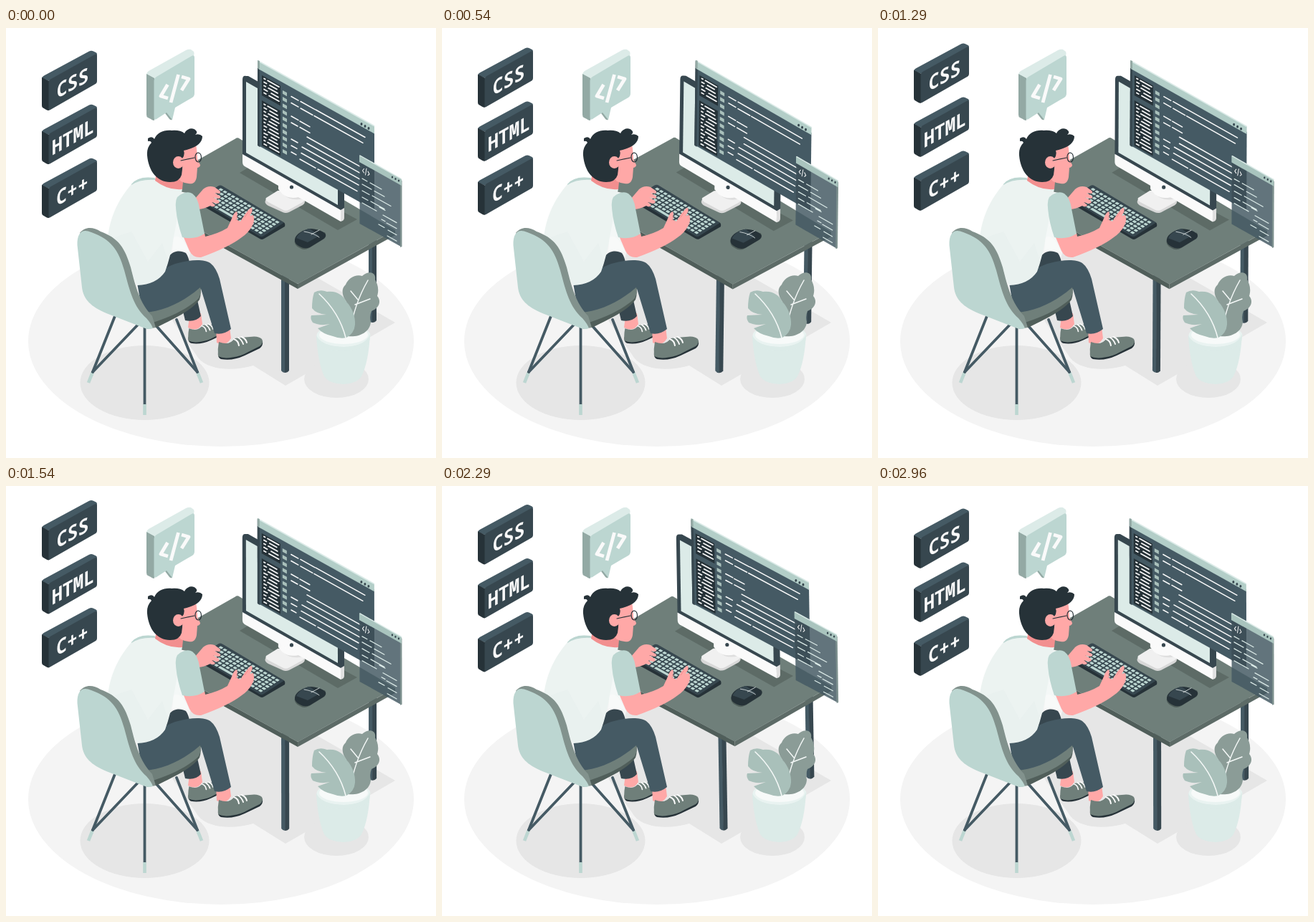
Animation of 600 by 600 pixels, one loop 3000 ms. Source, as an HTML page:

```html
<!DOCTYPE html>
<html lang="en">
<head>
<meta charset="utf-8">
<title>Programmer at a desk</title>
<style>
html, body { margin: 0; width: 100%; height: 100%; overflow: hidden; background: #fff; }
svg { display: block; width: 100vw; height: 100vh; }
.tag { font: 800 28.5px "Noto Sans Mono", "DejaVu Sans Mono", monospace; fill: #fafafa; text-anchor: middle; }
.ink { fill: none; stroke-linecap: round; stroke-linejoin: round; }
</style>
</head>
<body>
<svg id="stage" viewBox="0 0 600 600"></svg>
<script>
const C = {
  ink: '#263238', dark: '#37474f', slate: '#455a64', moss: '#6f7f7a', mossDark: '#505e5a',
  mint: '#bcd6d1', pale: '#dcebe8', skin: '#ffa8a7', blush: '#f28f8f', white: '#fafafa'
};
const SLOPE = 0.558;
const fill = (d, color, extra = '') => `<path d="${d}" fill="${color}" ${extra}/>`;
const ink = (d, color, width = 1.6, extra = '') =>
  `<path class="ink" d="${d}" stroke="${color}" stroke-width="${width}" ${extra}/>`;
const oval = (x, y, rx, ry, color) => `<ellipse cx="${x}" cy="${y}" rx="${rx}" ry="${ry}" fill="${color}"/>`;
const row = (x, y, len) => `M${x} ${y}l${len} ${(len * SLOPE).toFixed(2)}`;
const rows = list => list.map(r => row(...r)).join('');
// Upright panel receding to the right.
const panel = (x, y, w, h, color, extra) =>
  fill(`M${x} ${y}l${w} ${w * SLOPE}v${h}l${-w} ${-w * SLOPE}z`, color, extra);

function floor() {
  return oval(300, 437, 269, 147, '#f4f4f4') +
    fill('M390 499L543 411L385 320L262 296L232 408L268 460C282 478 318 479 345 471Z', '#e6e6e6') +
    oval(193.5, 495, 90, 52, '#e6e6e6') + oval(461, 490, 45, 26, '#e6e6e6');
}

function leg(x, y, bottom) {
  return fill(`M${x} ${y}V${bottom - 3}Q${x + 2} ${bottom} ${x + 5.5} ${bottom}V${y}Z`, C.slate) +
    fill(`M${x + 5} ${y}V${bottom}Q${x + 9} ${bottom} ${x + 11} ${bottom - 3}V${y}Z`, C.dark);
}

function desk() {
  return leg(384, 345, 481) + leg(506, 285, 411) +
    fill('M182 233L407 357V364L182 240Z', C.mossDark) +
    fill('M407 357L543 282V289L407 364Z', '#5d6b67') +
    fill('M320 154.5Q323 152 326 154.5L543 282L410 355.5Q407 358 404 355.5L182 233Z', C.moss) +
    fill('M326 202L346 190L490 267L463 282Z', '#5d6b66');
}

function keyboard() {
  let keys = '';
  for (let r = 0; r < 6; r++)
    for (let c = 0; c < 15; c++) {
      const space = r === 5 && c === 4;
      if (r === 5 && c > 4 && c < 9) continue;
      keys += `<rect x="${3 + c * 5.6}" y="${2.5 + r * 4.6}" width="${space ? 26 : 4}" height="3.1" rx=".6"/>`;
    }
  return fill('M299 220L388 271.5Q390 273 389 277L360 294Q357 296 354 294L267 244V239Z', C.ink) +
    fill('M296 220.5Q299 218.5 302 220.5L388 271.5L359 290.5Q356 292 353 290L267 239Z', C.dark) +
    `<g fill="${C.mint}" transform="matrix(1 .577 -1 .645 299 220)">${keys}</g>`;
}

function mouse() {
  return fill('M403 295Q401 303 410 307Q416 311 423 307L444 294Q448 290 445 285Z', C.mossDark) +
    fill('M403 295C404 287 416 281 424 280C434 280 444 284 446 288Q447 292 442 295L424 306Q417 309 410 305Q402 301 403 295Z', C.ink) +
    fill('M405 293C408 286 417 281 424 280L437 290L421 299Z', C.dark) +
    ink('M416 284Q429 286 437 292M426 288L437 282', '#e8eeee', 0.8);
}

function monitor() {
  return fill('M363 239Q359 244 366 248L386 257Q390 259 395 257L414 247Q419 244 416 238Z', '#d8d8d8') +
    fill('M363 237Q361 240 366 243L386 253.5Q390 256 395 253.5L414 243Q419 239 414 236L395 226L379 227Z', '#f0f0f0') +
    fill('M380 211L414 230V238Q398 242 388 233L380 224Z', '#dedede') +
    fill('M380 211L408 227V236Q395 239 386 232L380 225Z', C.white) +
    fill('M330 72Q330 66 335 67L338 67L472 143V252L467 255L330 177Z', C.dark) +
    fill('M335 75L463 148V247L335 174Z', C.pale) +
    fill('M330 176L467 254V270L333 193Q330 191 330 187Z', C.white) +
    fill('M467 254L472 251V265Q472 269 467 270Z', '#e0e0e0') +
    oval(398.5, 222, 2.6, 2.6, C.dark);
}

function editor() {
  const list = [], side = [];
  for (let i = 0; i < 17; i++) {
    const y = i < 5 ? 70.5 + i * 5 : 81 + i * 5.05;
    const gap = [3, 6, 4, 8, 5][i % 5];
    side.push([360, y, gap * 0.6], [360 + gap + 2, y + (gap + 2) * SLOPE, 19 - gap - (i * 3) % 4]);
  }
  let marks = '';
  for (let i = 0; i < 10; i++) marks += panel(386, 87 + i * 9.1, 6, 4.8, '#a9c0bb');
  list.push([398, 95.5, 10], [411, 102.5, 20], [398, 104.5, 10], [411, 112, 17],
    [432, 114, 69], [430, 122.5, 68], [398, 123, 10], [398, 132, 9], [410, 130, 14], [410, 138.5, 14],
    [398, 155, 9], [398, 164, 8], [398, 173, 7], [420, 152, 76], [420, 161, 74],
    [413, 166, 81], [412, 174.5, 80], [410, 183, 22], [435, 197, 55]);
  return fill('M351 46L355 56V166L351 163Z', C.dark) +
    panel(354, 55, 160, 110, C.slate) +
    fill('M351 56L354 56V166L351 164Z', C.dark) +
    panel(352, 46, 162, 11, '#b3cec8') +
    ink('M352 46L513.5 136.5', C.pale, 1.6) +
    fill('M351 45L354 46V57L351 56Z', '#93a9a4') +
    panel(357, 66, 26, 28, C.ink) + panel(357, 101, 26, 63, C.ink) +
    ink(rows(side), C.white, 1.7) + marks + ink(rows(list), C.white, 1.5) +
    oval(496, 134, 1.5, 1.9, C.dark) + oval(501, 137, 1.5, 1.9, C.dark) + oval(506, 140, 1.5, 1.9, C.dark);
}

function popup() {
  const list = [[497, 210, 7], [508, 216, 16], [497, 218, 13], [514, 227.5, 14], [497, 227, 10], [511, 234, 26],
    [497, 236, 8], [509, 242, 19], [497, 244, 20], [521, 250, 8], [526, 261, 19], [531, 272, 14],
    [520, 274, 8], [533, 282, 12], [524, 267, 5], [532, 290, 13]];
  return panel(493.5, 180, 58, 93, C.slate, 'opacity=".84"') +
    fill('M493.5 187L514 198.5V254L493.5 243Z', C.dark, 'opacity=".5"') +
    fill('M550 212L552.5 213V305L550 306Z', '#7e918f') +
    panel(493, 177.5, 59, 9.5, '#a9c4be') + ink('M494 178L551.5 210.5', C.pale, 1.4) +
    ink('M499.5 196.5L497.5 199L499.5 202M503 196L501.5 205M505 200L507 204L505 205.5', C.white, 1) +
    ink(rows(list), C.pale, 1.2) +
    oval(539, 208, 1.2, 1.6, C.dark) + oval(543.5, 210.5, 1.2, 1.6, C.dark) + oval(548, 213, 1.2, 1.6, C.dark);
}

function shoe(x, y, scale) {
  return `<g transform="translate(${x} ${y}) scale(${scale})">` +
    fill('M0 20Q-1 28 4 30Q20 33 37 25L58 15Q63 11 62 5L30 20Z', C.ink) +
    fill('M1 6Q-1 16 0 26Q8 30 20 27.5Q32 26 42 20L58 12Q64 7 61 2Q56 -3 44 -1Q31 0 23 1Q16 12 1 6Z', C.moss) +
    ink('M22 2Q28 4 29 11M28 0Q33 3 35 9M33 -1Q39 2 40 7', C.white, 2) + '</g>';
}

function legs() {
  return fill('M256 402L272 398L274 413Q267 425 254 418Z', C.skin) + shoe(254.5, 414, 0.86) +
    fill('M223 338C222 312 240 308 251 314Q256 321 257 335L272 402Q264 411 250 408L236 350Z', C.dark) +
    fill('M293 418L312 417L314 433Q306 446 294 439Z', C.skin) + shoe(296, 432, 1) +
    fill('M183 356C210 349 215 336 236 329C256 323 276 322 285 328Q293 334 298 350L314 420Q303 429 291 426L272 364L225 402L190 396Z', C.slate);
}

function chairLegs() {
  return [[152, 402, 115, 495], [193.5, 416, 193.5, 540], [238, 407, 273, 495]].map(([x, y, a, b]) => {
    const t = 15 / Math.hypot(a - x, b - y), ex = a - (a - x) * t, ey = b - (b - y) * t;
    return ink(`M${x} ${y}L${ex} ${ey}`, C.slate, 3.8) +
      ink(`M${ex} ${ey}L${a} ${b}`, C.mint, 4.6, 'style="stroke-linecap:butt"');
  }).join('') + ink('M184 414L121 480M210 416L267 480', C.slate, 3.8);
}

function seat() {
  return fill('M195 400C220 397 255 378 271 362Q273 370 270 379C260 394 230 408 209 418Q198 419 193 410Z', C.mossDark) +
    fill('M192 397C222 396 250 380 271 362Q273 369 269 377C253 393 225 405 205 411Q195 410 192 397Z', C.moss);
}

function chairBack() {
  return fill('M103 286C110 277 121 277 132 284C157 293 166 307 174 334C181 362 187 384 204 402L209 418L197 420L160 360Z', '#82928d') +
    fill('M99.5 303C99 286 106 279 119 285C147 295 157 310 165 338C173 368 178 389 196 405Q203 413 205 419Q200 421 194 419L140 398C119 389 108 379 106 362Z', C.mint);
}

function torso() {
  return fill('M222 224L252 230L250 295L234 310Z', '#f4f8f7') +
    fill('M175 218Q184 206 207 209L246 224Q240 260 234 292Q230 318 222 340Q210 358 183 359L142 292C146 258 160 236 175 218Z', '#ecf3f1') +
    fill('M234 292Q245 286 256 313Q243 308 232 311Z', '#f8faf9') +
    fill('M152 292L175 284L198 326L218 300L226 326Q218 357 183 358Z', '#e2ecea', 'opacity=".35"') +
    fill('M175 218Q184 206 207 209L210 212Q188 210 175 219Z', C.mint);
}

function head() {
  return fill('M209 207L218 195L246 203L247 215L246 225Q226 227 208 213Z', C.blush) +
    fill('M240 172L265 162Q267 174 267 183L271 191Q271 194 267 195L266 208Q265 215 260 217Q252 218 244 214L232 199Z', C.skin) +
    fill('M198 154Q204 150 207 155C211 146 220 142 231 143Q243 142 249 147C252 140 261 138 265 143Q268 146 264 149Q270 147 274 151C274 160 266 167 248 171Q250 177 246 182Q247 193 245 205Q242 215 229 215C211 215 199 200 197 178Q196 167 203 160Q202 157 198 158Z', C.ink) +
    oval(240.5, 187.5, 7.5, 8.5, C.skin) +
    ink('M244 185L263 181M264 179Q265 174 268.5 174Q272.500 175 272.500 181Q272 187 268 187Q264 186 264 179', C.ink, 1.2);
}

function farHand() {
  return fill('M263 239L275 225Q282 219 291 222L298 227Q301 230 297 231L291 230L299 235Q300 238 296 238L289 236L297 241Q299 245 294 245L287 243L292 247Q290 251 285 248Q276 253 266 253Z', C.skin);
}

function nearArm() {
  return fill('M247 290L277 286L278 291Q296 287 309 279L315 266Q318 257 322 256Q324 260 321 267L327 270L334 259L341 251Q345 250 343 257L340 262L345 261Q348 270 343 277Q338 286 329 292Q311 306 272 320Q261 321 256 311Z', C.skin) +
    ink('M321 268L323 264M333 264L338 257', C.blush, 1) +
    fill('M239 236Q250 226 260 231Q268 237 270 252L277 287Q263 296 246 292Q238 269 237 250Q236 241 239 236Z', C.mint);
}

function plant() {
  return fill('M433 429Q435 466 444 486Q450 496 471 497Q490 496 496 486Q506 466 508 427Z', C.pale) +
    oval(471, 429, 37.5, 16, '#e9f3f1') + oval(471, 428, 34, 13, '#f7faf9') +
    fill('M477 430C490 432 508 426 509 410Q507 402 510 395C521 391 524 381 518 374C521 364 518 356 515 351C517 340 505 338 497 346C487 343 477 350 474 358C467 364 469 374 475 382Z', '#8b9c97') +
    ink('M505 352Q486 385 480 424M491 379L481 367M487 386L508 378', '#f4f8f7', 1.5) +
    fill('M430 369Q438 364 448 368C461 366 471 373 475 382C483 390 488 404 487 414Q486 426 475 432Q466 434 456 430Q442 427 435 419L452 413Q438 416 428 411Q424 405 426 401L447 400Q433 399 427 391Q427 378 430 369Z', '#a9c0ba') +
    ink('M437 371Q465 397 474 432', '#f4f8f7', 1.6) +
    fill('M433 429Q440 444 471 445Q502 444 508 427Q508 439 504 443Q490 451 471 451Q445 450 435 442Z', C.pale);
}

function tag(label, y, textX) {
  return `<g transform="translate(0 ${y})">` +
    fill('M50 70Q50 68 53 66.5L116 32.5Q119 31 122 32.5L126 34.5Q127 35 127 37L60 74Z', C.slate) +
    fill('M50 69L60 74V115Q58 115.5 56 114L51 111Q50 110 50 108Z', C.ink) +
    fill('M59.5 76Q59.5 73 62 71.5L124 37Q127 35.5 127 38V74Q127 77 124 78.5L62 114Q59.5 116 59.5 113Z', C.dark) +
    `<text class="tag" transform="matrix(.866 -.48 0 1 ${textX} 86.5)">${label}</text></g>`;
}

function bubble() {
  return fill('M196 65Q196 62 199 60L251 31Q255 29 258 30L262 33Q263 35 262 39L207 71Z', C.pale) +
    fill('M196 64L207 70V129Q204 129 202 127L198 125Q196 124 196 121Z', '#93a9a4') +
    fill('M222 119L226 116L232 128Q230 129 228 127Z', '#93a9a4') +
    fill('M206.5 74Q206.5 70 210 68L259 39Q263 37 263 41V91Q263 95 260 97L236 111L232 128L224 118L210 127Q206.5 129 206.5 125Z', C.mint) +
    ink('M225.5 79L216 95L226 98M240.5 65L230 104M245 68L255 71L245 87', C.white, 4.8, 'style="stroke-linecap:butt"');
}

const stage = document.getElementById('stage');
stage.innerHTML = floor() +
  `<g id="desk">${desk() + keyboard() + mouse() + monitor() + editor() + popup()}</g>` +
  farHand() + chairLegs() + legs() + seat() + torso() + chairBack() + head() + nearArm() + plant() + bubble() +
  `<g id="tags">${tag('CSS', 0, 93) + tag('HTML', 75, 93.5) + tag('C++', 150, 92.5)}</g>`;

const deskGroup = document.getElementById('desk');
const tagGroup = document.getElementById('tags');
const LOOP = 3000;
const SWAY = [[0, 0], [0.25, 1], [0.75, -1], [1, 0]];
const LIFT = [[0, 0], [0.5, -12], [1, 0]];

function at(steps, p) {
  const i = steps.findIndex(s => s[0] > p);
  const [p0, v0] = steps[i - 1], [p1, v1] = steps[i];
  return v0 + (v1 - v0) * (p - p0) / (p1 - p0);
}

const start = performance.now();
function draw() {
  const p = Math.max(0, performance.now() - start) % LOOP / LOOP;
  deskGroup.setAttribute('transform', `rotate(${at(SWAY, p)} 367 263)`);
  tagGroup.setAttribute('transform', `translate(0 ${at(LIFT, p)})`);
  requestAnimationFrame(draw);
}
draw();
</script>
</body>
</html>
```
